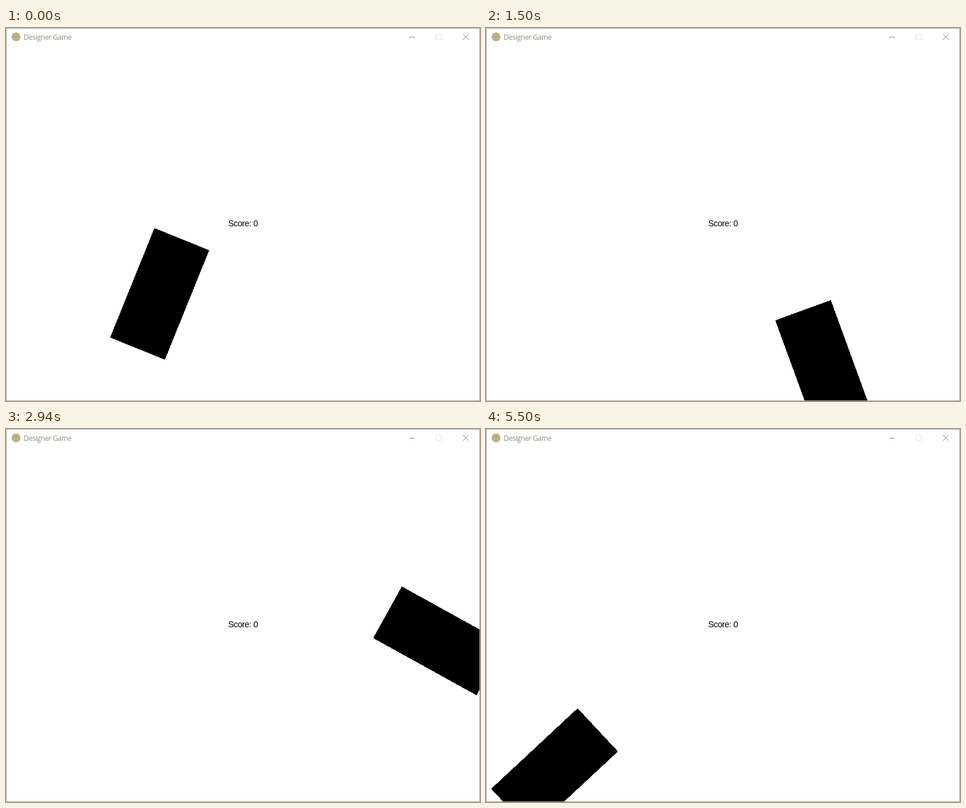
An HTML page that plays this animation: 802x632 px, repeating every 5570 ms.

```html
<!DOCTYPE html>
<html lang="en">
<head>
<meta charset="utf-8">
<title>Designer Game</title>
<style>
  html, body { margin: 0; width: 100%; height: 100%; overflow: hidden; background: #fff; }
  svg { display: block; width: 802px; height: 632px; }
  .title { font: 12px "Open Sans", "Noto Sans", sans-serif; letter-spacing: -.42px; fill: #968c7c; }
  .score { font: 14.5px "Liberation Sans", Arial, sans-serif; letter-spacing: -.5px; fill: #000; }
</style>
</head>
<body>
<svg viewBox="0 0 802 632">
  <defs><clipPath id="field"><rect x="1" y="31" width="800" height="600"/></clipPath></defs>
  <rect width="802" height="632" fill="#fff"/>
  <circle cx="17" cy="15" r="7.5" fill="#b9b183"/>
  <text class="title" x="30" y="20">Designer Game</text>
  <g fill="none" shape-rendering="crispEdges">
    <path d="M682 15.5h10" stroke="#8c8c8c"/>
    <rect x="727.5" y="10.5" width="9" height="9" stroke="#e4e4e4"/>
  </g>
  <path d="M773 10l10 10M783 10l-10 10" stroke="#8c8c8c" fill="none"/>
  <text class="score" x="376" y="336">Score: 0</text>
  <g clip-path="url(#field)">
    <rect id="box" x="-100" y="-50" width="200" height="100" shape-rendering="crispEdges"/>
  </g>
  <rect x=".5" y=".5" width="801" height="631" fill="none" stroke="#a3a3a3" shape-rendering="crispEdges"/>
</svg>
<script>
  const LOOP = 5570, STEP = 68.5, LEAD = 18, LAST = 80;
  const HOLD = 4.37;   // steps between two hops
  const box = document.getElementById("box");

  // Key points: the box centre after each hop; it rests on the last one
  const centres = [
    [260, 450.5], [574, 318], [563, 128], [2, 333.5], [342, 222], [570.7, 572.2],
    [492, 243], [392, 310.5], [134.5, 243], [409, 138], [733, 359], [530, 130],
    [99.8, 567.7], [615, 447], [390.5, 409], [390.5, 409], [116, 578]
  ];

  function draw(t) {
    const step = Math.min(LAST, Math.floor((t + LEAD) / STEP));
    const hop = Math.min(centres.length - 1, Math.floor((step + 4) / HOLD));
    const angle = 68 + Math.floor(1.942 * step);
    box.setAttribute("transform", `translate(${centres[hop]}) rotate(${-angle})`);
  }

  const start = performance.now();
  function tick(now) {
    draw(Math.max(0, now - start) % LOOP);
    requestAnimationFrame(tick);
  }
  draw(0);
  requestAnimationFrame(tick);
</script>
</body>
</html>
```
